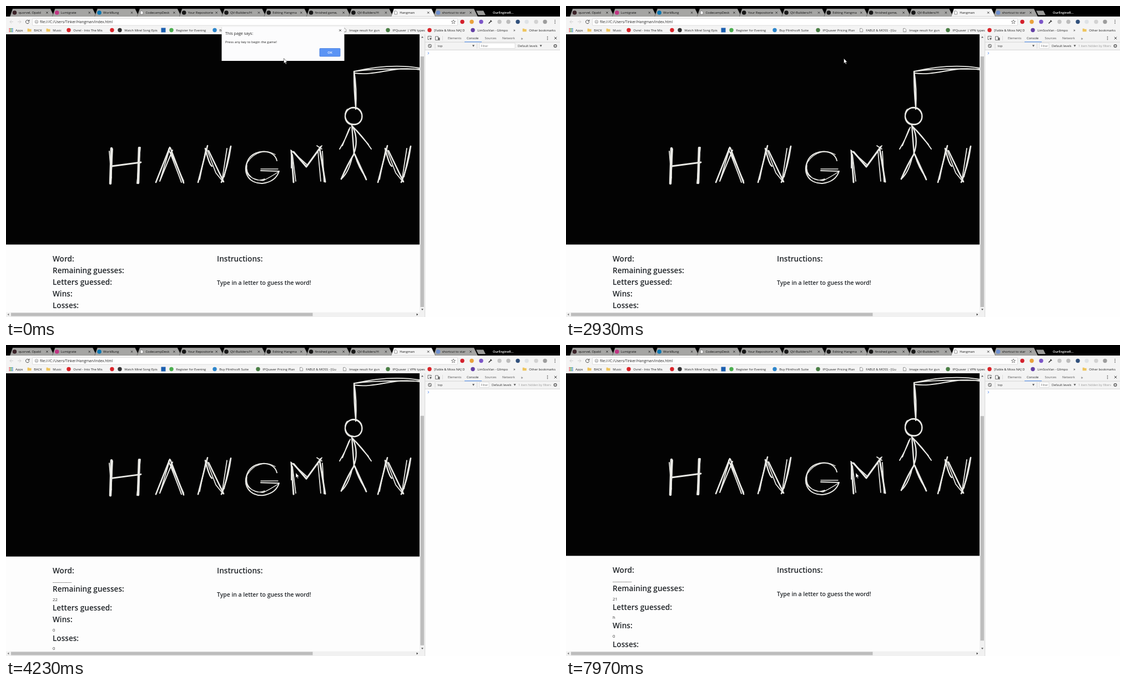
Write an HTML page that moves like this. It is 998 px wide and 561 px high and loops after 8 s.

```html
<!DOCTYPE html>
<html lang="en">
<head>
<meta charset="utf-8">
<title>Hangman</title>
<style>
  html, body { margin: 0; width: 100%; height: 100%; overflow: hidden; background: #fdfdfd; }
  svg { display: block; width: 100vw; height: 100vh; }
  text { font-family: "Open Sans", "Noto Sans", sans-serif; white-space: pre; }
  .heading { font-weight: 600; fill: #212529; }
  .chalk path { fill: none; stroke: #e9e9e5; stroke-linecap: round; stroke-linejoin: round; }
</style>
</head>
<body>
<svg id="stage" viewBox="0 0 998 561"></svg>
<script>
const LOOP = 8000;
const INK = '#222';

const rect = (x, y, w, h, fill, extra = '') =>
  `<rect x="${x}" y="${y}" width="${w}" height="${h}" fill="${fill}" ${extra}/>`;
const dot = (x, y, r, fill) => `<circle cx="${x}" cy="${y}" r="${r}" fill="${fill}"/>`;
const path = (d, stroke, width = 1, fill = 'none') =>
  `<path d="${d}" stroke="${stroke}" stroke-width="${width}" fill="${fill}"/>`;
const shape = (d, fill) => `<path d="${d}" fill="${fill}"/>`;
const text = (x, y, size, content, fill = INK, extra = '') =>
  `<text x="${x}" y="${y}" font-size="${size}" fill="${fill}" ${extra}>${content.replace(/&/g, '&amp;')}</text>`;
const heading = (x, y, size, content) => text(x, y, size, content, '#212529', 'class="heading"');
const cross = (x, y, r, color, width = 0.9) =>
  path(`M${x - r} ${y - r}l${2 * r} ${2 * r}m0 ${-2 * r}l${-2 * r} ${2 * r}`, color, width);
const sheet = (x, y) => path(`M${x - 2.3} ${y - 3}h3l1.8 1.8v4.2h-4.8z`, '#666', 0.7, '#fff');
const folder = (x, y) => shape(`M${x - 3.4} ${y - 2.8}h2.6l1 1h3.4v4.6h-7z`, '#eec45c');

// Browser window

function tabStrip() {
  const tabs = [
    ['quorvel, Opald', '#3b2228'], ['Lumigrate', '#c13584'], ['WorkRung', '#0a78b5'],
    ['CodecampDesk', ''], ['Your Repositorie', '#181818'], ['QV-Builders/H', '#181818'],
    ['Editing Hangma', '#181818'], ['finished game, ', '#181818'], ['QV-Builders/H', '#181818'],
    ['Hangman', ''], ['shortcut to star', '#6d8fd0']
  ];
  const active = 9;
  const draw = (i) => {
    const [label, color] = tabs[i], x = 7 + 76.3 * i;
    return path(`M${x} 19.2L${x + 5} 5H${x + 73}L${x + 80} 19.2z`, '#3a3a3a', 0.5, i === active ? '#f4f4f4' : '#a5a5a3') +
      (color ? dot(x + 8.5, 12, 3.8, color) : sheet(x + 8.5, 12)) +
      text(x + 15.5, 14.2, 5.9, label, '#111') + cross(x + 67, 12, 1.7, '#333');
  };
  return rect(0, 0, 998, 19, '#000') +
    tabs.map((_, i) => i).filter(i => i !== active).map(draw).join('') + draw(active) +
    shape('M847 8.5h13l4 8h-13z', '#9b9b99') +
    text(877, 14, 5.7, 'OurEngineR...', '#fff', 'font-weight="600"');
}

function toolbar() {
  const extensions = [
    [822, '#d3202c'], [839, '#e9a23c'], [856, '#7c55c8'], [889, '#c4c4c4'], [905, '#bcbcbc'],
    [922, '#30507c'], [938, '#dfe3e6'], [955, '#d2d2d2'], [971, '#9d9d9d']
  ];
  return rect(0, 19, 998, 32, '#f4f4f4') +
    path('M13 28.5H7m3-3l-3 3l3 3M21 28.5h6m-3-3l3 3l-3 3', '#d0d0d0', 1) +
    path('M41 26.6a3.1 3.1 0 1 0 .7 2.4M42 24.8v2.5h-2.6', '#444', 1) +
    rect(47.5, 22.5, 766, 12.5, '#fff', 'stroke="#c9c9c9" stroke-width=".6" rx="1"') +
    dot(55, 28.5, 3, '#666') + dot(55, 28.5, 2.4, '#fff') + rect(54.6, 28, 0.8, 2, '#555') + rect(54.6, 26.7, 0.8, 0.8, '#555') +
    text(61, 30.8, 6.5, 'file:///C:/Users/Tinker/Hangman/index.html') +
    path('M806 25l1 2.4l2.6.2l-2 1.7l.7 2.5l-2.3-1.4l-2.3 1.4l.7-2.5l-2-1.7l2.6-.2z', '#555', 0.7) +
    extensions.map(([x, color]) => dot(x, 28.5, 3.7, color)).join('') +
    path('M869.5 31.5l4-4m-.8-1.6l2.4 2.4', '#333', 1.6) +
    [25.7, 28.5, 31.3].map(y => dot(989, y, 0.8, '#444')).join('');
}

function bookmarks() {
  const FOLDER = 'folder', PAGE = 'page', RED = '#d9252a', VPN = '#4a7f45';
  const items = [
    [42, FOLDER, 'BACK'], [76, FOLDER, 'Music'], [113, RED, 'Ovrel - Into The Mis'], [191, RED, ''],
    [205, '#333', 'Watch Mirel Song Epis'], [298, '#4caf50', 'Register for Evening'],
    [376, '#2d86cc', 'Buy Plinthsoft Suite'], [454, VPN, 'IPQuaver Pricing Plan'],
    [532, PAGE, 'FABLE & MOSS - [Gu'], [610, PAGE, 'Image result for gun'],
    [688, VPN, 'IPQuaver | VPN types'], [763, RED, '[Fable & Moss NA] D'],
    [841, '#6441a5', 'LimSooVan - Glimpo'], [934, FOLDER, 'Other bookmarks']
  ];
  let apps = '';
  for (let i = 0; i < 9; i++) {
    apps += rect(5.5 + (i % 3) * 2.6, 40 + Math.floor(i / 3) * 2.6, 1.9, 1.9, ['#d9534f', '#4caf50', '#4285c8'][i % 3]);
  }
  return apps + text(17, 45.7, 5.8, 'Apps') +
    items.map(([x, icon, label]) =>
      (icon === FOLDER ? folder(x, 43.5) : icon === PAGE ? sheet(x, 43.5) : dot(x, 43.5, 3.7, icon)) +
      text(x + 8.3, 45.7, 5.8, label)).join('') +
    rect(279.5, 39.5, 8, 8, '#1b5fb0') + text(914, 45.7, 7, '»');
}

function scrollbars() {
  return rect(745, 51, 9.5, 510, '#f1f1f1') + rect(0, 552.5, 754, 8.5, '#f1f1f1') +
    shape('M748 57.3l2-2.6l2 2.6z', '#555') + shape('M748 546.3l2 2.6l2-2.6z', '#555') +
    shape('M5.3 554.5l-2.6 2l2.6 2z', '#777') + shape('M739.7 554.5l2.6 2l-2.6 2z', '#333') +
    rect(9, 553.5, 543.5, 6, '#bdbdbd') +
    rect(746.5, 91, 6.5, 452, '#bdbdbd', 'id="thumb"');
}

function devtools() {
  const tabs = [[796, 'Elements'], [830, 'Console'], [862.5, 'Sources'], [894, 'Network']];
  const arrow = (x) => shape(`M${x - 2} 70.2h4l-2 3.6z`, '#555');
  const levels = (x) => text(x, 74.2, 5.7, 'Default levels', '#333') + arrow(x + 41.5);
  const box = (w) => rect(853, 67, w, 9.5, '#fff', 'stroke="#ccc" stroke-width=".6"') +
    text(855.5, 74.2, 5.6, 'Filter', '#777');
  return rect(754.5, 51, 243.5, 510, '#fefefe') + rect(754.5, 51, 243.5, 28.5, '#f3f3f3') +
    path('M754.7 51v510M755 65.2h243M755 79.3h243', '#c8c8c8', 0.7) +
    path('M766 57v-2.5h-6v6h2.5M773.5 55h5v6.5h-5z', '#555', 0.8) + shape('M763 57l4.5 2l-2 .7l-.8 2z', '#444') +
    rect(779, 57, 2.5, 5, '#666') + path('M786.5 54v8', '#ccc', 0.6) +
    tabs.map(([x, label]) => text(x, 60.4, 5.7, label, label === 'Console' ? INK : '#555')).join('') +
    rect(826, 64.3, 31, 1, '#4285e8') + text(927.5, 60.6, 7.5, '»', '#444') +
    [55.5, 58, 60.5].map(y => dot(975.5, y, 0.8, '#444')).join('') + cross(990, 58, 2.2, '#444', 1) +
    dot(763.5, 72, 3.2, '#555') + dot(763.5, 72, 2.3, '#f3f3f3') + path('M761.6 70.1l3.8 3.8', '#555', 0.9) +
    text(777.5, 74.2, 5.7, 'top', '#333') + arrow(842) + path('M773 67v10M848.5 67v10', '#ccc', 0.6) +
    `<g id="wideFilter">${box(64) + levels(922)}</g>` +
    `<g id="narrowFilter">${box(17) + levels(875)}${text(923, 74.2, 5.5, '1 item hidden by filters', '#999')}</g>` +
    dot(989.5, 72, 3.1, '#666') + dot(989.5, 72, 1.5, '#f3f3f3') +
    path('M759.8 83.2l2 1.9l-2 1.9', '#3b78e7', 0.9);
}

// Chalk lettering, as [stroke width, path]

const letterN = [
  [2.6, 'M363 252L346 318'], [1.6, 'M360 258L349 313'], [2.6, 'M359 257Q366 286 371 289M365 261L392 317'],
  [1.8, 'M362 259L378 301L391 317'], [2.6, 'M405 253Q400 290 388 318'], [1.8, 'M398 257L389 316M404 255L393 308']
];
const strokes = [
  [4.5, 'M190 257L188 320M240 256L238 319'], [1.8, 'M192 258L189 320M242 255L236 320M186 262L190 310'],
  [2.8, 'M190 289L243 282'],
  [2.6, 'M295 255L270 318M296 256L320 319'], [2, 'M294 260L277 316L300 260M293 258Q308 296 316 318M297 264L320 316'],
  [2, 'M488 279C483 258 450 257 437 276C423 302 440 321 462 320C478 318 488 310 492 298L459 297'],
  [1.4, 'M485 268C468 258 447 263 435 282C426 304 442 313 463 315Q476 309 491 299M434 287C431 306 449 319 466 312M459 294H490'],
  [3, 'M514 262L518 318M518 263L541 290L567 254M565 257L575 317'],
  [1.8, 'M516 268L522 316M513 260L543 287L569 252M562 262L567 316M570 262L573 317M560 252L569 258M514 271L514 292'],
  [1.9, 'M627 118Q692 103 746 112M627 121C668 127 698 107 746 115M627 118Q665 112 746 114'],
  [2.4, 'M627 118Q632 148 630 186M627 119Q627 155 630 182'],
  [2.4, 'M626 183C646 183 647 214 626 214C606 215 606 184 626 183'],
  [1.6, 'M617 186C636 176 650 201 635 212C616 219 604 198 615 186'],
  [2, 'M620 219Q612 240 601 258M618 222L606 252M624 217Q642 234 658 258M628 221L653 250'],
  [2.4, 'M623 215L627 268M625 218Q636 243 626 268'],
  [2.8, 'M627 267Q615 286 604 312M628 267L649 313'], [2, 'M624 271Q618 298 606 310M629 270Q635 291 648 309']
];
const draw = list => list.map(([w, d]) => `<path d="${d}" stroke-width="${w}"/>`).join('');

function page() {
  return rect(0, 51, 746, 510, '#fdfdfd') +
    `<g id="content">${rect(0, 0, 746, 430.3, '#030303')}
      <g class="chalk">${draw(strokes)}${draw(letterN)}<g transform="translate(324)">${draw(letterN)}</g></g>
      ${heading(380, 460.6, 13.6, 'Instructions:')}
      ${heading(380, 502.6, 10.4, 'Type in a letter to guess the word!')}
      <g id="score"></g></g>`;
}

function dialog() {
  return `<g id="dialog">${rect(388, 38, 222, 61.7, '#000', 'opacity=".2"')}
    ${rect(388.5, 37.5, 221, 61.5, '#fcfcfd')}
    ${text(395, 51.8, 7.2, 'This page says:')}${text(395, 67.3, 6.1, 'Press any key to begin the game!')}
    ${cross(602, 44, 1.8, '#444')}
    ${rect(565, 76.5, 37, 14.5, '#5b94f5', 'stroke="#3f76d8" stroke-width=".7" rx="1"')}
    ${text(583.5, 85.9, 6.1, 'OK', '#fff', 'text-anchor="middle" font-weight="600"')}</g>`;
}

const stage = document.getElementById('stage');
stage.innerHTML = page() + scrollbars() + devtools() + tabStrip() + toolbar() + bookmarks() + dialog() +
  `<g id="cursor">${path('M0 0v9l2-1.8l1.5 3.3l1.4-.7l-1.5-3.1h2.8z', '#000', 0.5, '#fff')}</g>`;
const el = Object.fromEntries([...stage.querySelectorAll('[id]')].map(node => [node.id, node]));

// Timeline

const progress = (t, start, length) => Math.min(1, Math.max(0, (t - start) / length));
const smooth = p => p * p * (3 - 2 * p);
const BLANKS = '_'.repeat(10);
const STATES = [
  { from: 0, values: {}, thumb: [91, 452] },
  { from: 3130, values: { 'Word:': BLANKS, 'Remaining guesses:': '22', 'Wins:': '0', 'Losses:': '0' }, thumb: [88, 414] },
  { from: 5400, values: { 'Word:': BLANKS, 'Remaining guesses:': '21', 'Letters guessed:': 'h', 'Wins:': '0', 'Losses:': '0' }, thumb: [87.5, 405] }
];
let shown = null;

function showScore(state) {
  let y = 460.6, out = '';
  for (const label of ['Word:', 'Remaining guesses:', 'Letters guessed:', 'Wins:', 'Losses:']) {
    const value = state.values[label];
    out += heading(84, y, 13.6, label);
    if (value) out += text(84, y + 16.5, 7.7, value, '#333');
    y += value ? 33.6 : 21.2;
  }
  el.score.innerHTML = out;
  shown = state;
}

function render(t) {
  const state = STATES.filter(s => t >= s.from).pop();
  if (state !== shown) showScore(state);

  const scroll = 50 * smooth(progress(t, 4050, 200));
  el.content.setAttribute('transform', `translate(0 ${-scroll})`);
  el.thumb.setAttribute('y', state.thumb[0] + scroll * 0.815);
  el.thumb.setAttribute('height', state.thumb[1]);

  const closing = progress(t, 1400, 200);
  el.dialog.setAttribute('opacity', 1 - closing);
  el.dialog.setAttribute('transform', `translate(0 ${-12 * closing})`);

  const filtered = t >= 1450;
  el.wideFilter.setAttribute('display', filtered ? 'none' : 'inline');
  el.narrowFilter.setAttribute('display', filtered ? 'inline' : 'none');

  const move = smooth(progress(t, 3500, 330));
  el.cursor.setAttribute('transform', `translate(${500.5 + 21.5 * move} ${94.5 + 136 * move})`);
}

function tick() {
  render(performance.now() % LOOP);
  requestAnimationFrame(tick);
}
tick();
</script>
</body>
</html>
```
